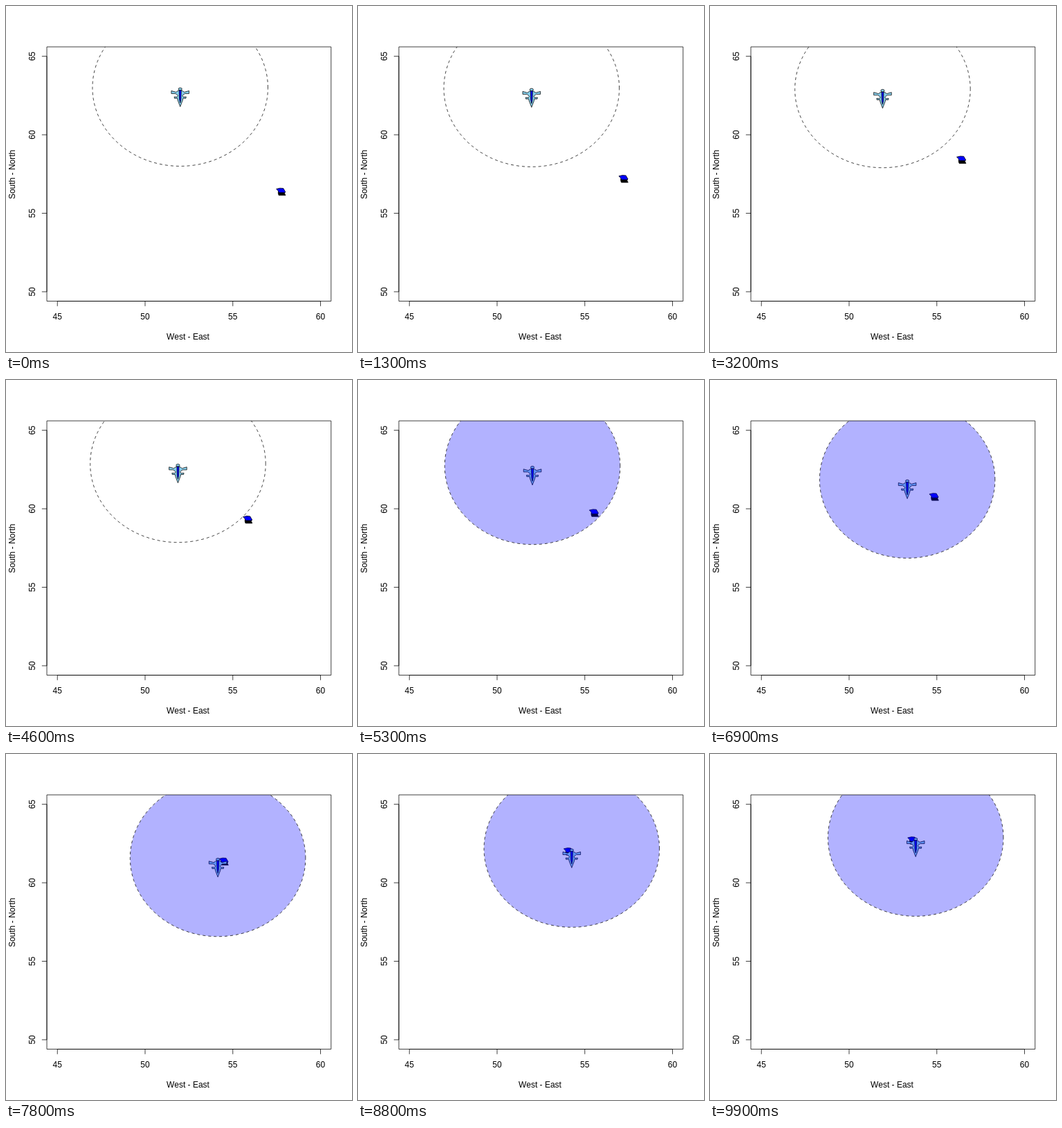
An HTML page for the animation above (10000 ms loop, 500 by 500 pixels).

```html
<!DOCTYPE html>
<html lang="en">
<head>
<meta charset="utf-8">
<title>Pursuit</title>
<style>
  html, body { margin: 0; width: 100%; height: 100%; overflow: hidden; background: #fff; }
  svg { display: block; width: 500px; height: 500px; }
  text { font: 12px "Liberation Sans", Arial, Helvetica, sans-serif; text-anchor: middle; }
  .axis { fill: none; stroke: #000; stroke-width: .75; }
  .bird { stroke: #000; stroke-width: .75; stroke-linejoin: round; }
</style>
</head>
<body>
<svg viewBox="0 0 500 500">
  <defs><clipPath id="plot"><rect x="59.04" y="59.04" width="410.72" height="367.52"/></clipPath></defs>
  <g clip-path="url(#plot)">
    <g id="prey" class="bird">
      <path fill="#000" d="M-4 0H6L5.2 2.6L6.6 5.2H-3.2L-4 2.8Z"/>
      <path fill="#00f" d="M-6.8 -4L-1.5 -5.2L3.4 -4.9L6.2 0L5.4 1.3H-3L-4.3 -1.6Z"/>
    </g>
    <g id="hunter" class="bird"></g>
    <path id="range" stroke="#000" stroke-width=".75" stroke-dasharray="4 4"/>
  </g>
  <g id="axes"></g>
</svg>
<script>
const STEP = 100, COUNT = 100, REACH = 5, SPEED = 0.098;
const UX = 25.353, UY = 22.686;           // pixels per unit
const LEFT = 59.04, TOP = 59.04, RIGHT = 469.76, BOTTOM = 426.56, TICK = 7.2;
const X = u => 74.25 + (u - 45) * UX;
const Y = u => 412.95 - (u - 50) * UY;
const $ = id => document.getElementById(id);

function add(parent, tag, attrs, text) {
  const el = document.createElementNS("http://www.w3.org/2000/svg", tag);
  for (const k in attrs) el.setAttribute(k, attrs[k]);
  if (text) el.textContent = text;
  parent.appendChild(el);
  return el;
}

function drawAxes() {
  const g = $("axes");
  const line = d => add(g, "path", { class: "axis", d });
  const label = (s, x, y, turn) =>
    add(g, "text", turn ? { transform: `translate(${x} ${y}) rotate(-90)` } : { x, y }, s);
  line(`M${LEFT} ${TOP}H${RIGHT}V${BOTTOM}H${LEFT}Z`);
  line(`M${X(45)} ${BOTTOM}H${X(60)}`);
  line(`M${LEFT} ${Y(50)}V${Y(65)}`);
  for (const u of [45, 50, 55, 60]) {
    line(`M${X(u)} ${BOTTOM}v${TICK}`);
    label(u, X(u), 453);
  }
  for (const u of [50, 55, 60, 65]) {
    line(`M${LEFT} ${Y(u)}h${-TICK}`);
    label(u, 42, Y(u), true);
  }
  label("West - East", 263, 482);
  label("South - North", 12.6, 243.4, true);
}

function drawHunter() {
  // right half, mirrored for the left
  const half = [[2.4, 4], [6, 6.4], [12.8, 4.5], [12.8, 8.6], [6.6, 8.6], [3.2, 11.4], [4.6, 13.6],
    [8.6, 13.2], [8.2, 15.4], [4.2, 15.2], [3.6, 18]];
  const mirror = half.map(([x, y]) => [-x, y]).reverse();
  const g = $("hunter");
  add(g, "polygon", { fill: "skyblue", points: [...half, [0, 27.5], ...mirror].join(" ") });
  add(g, "polygon", { fill: "#00f", points: "-1.5,3.6 1.5,3.6 1.1,17 0,22 -1.1,17" });
  add(g, "ellipse", { fill: "skyblue", cx: 0, cy: 2, rx: 2.6, ry: 1.8 });
}

// step, x, y of the prey's middle
const path = [[0, 397.4, 268.4], [13, 383.7, 249.8], [32, 363.3, 222.2], [46, 349.3, 201.8],
  [60, 332.8, 182.4], [78, 314.7, 155.4], [99, 292.5, 125]];

function preyAt(n) {
  let i = 1;
  while (path[i][0] < n) i++;
  const [a, ax, ay] = path[i - 1], [b, bx, by] = path[i];
  const k = (n - a) / (b - a);
  return [ax + (bx - ax) * k, ay + (by - ay) * k];
}

// drift, then pure pursuit once the prey is in reach
function simulate() {
  const states = [];
  let x = X(52), y = Y(63), chase = false, caught = false;
  for (let n = 0; n < COUNT; n++) {
    const prey = preyAt(n);
    const tx = prey[0] + 4.7, ty = prey[1] - 4;
    const dist = () => Math.hypot((tx - x) / UX, (ty - y) / UY);
    if (chase) {
      const d = dist();
      if (caught || d <= SPEED) {
        caught = true;
        x = tx; y = ty;
      } else {
        x += (tx - x) * SPEED / d;
        y += (ty - y) * SPEED / d;
      }
    } else {
      if (n) { x -= 0.071; y += 0.07; }
      chase = dist() < REACH;
    }
    states.push({ prey, x, y, chase });
  }
  return states;
}

drawAxes();
drawHunter();
const rx = REACH * UX, ry = REACH * UY;
$("range").setAttribute("d",
  `M${rx} 0A${rx} ${ry} 0 0 0 ${-rx} 0A${rx} ${ry} 0 0 0 ${rx} 0Z`);
const states = simulate();

function render() {
  const s = states[Math.floor(performance.now() / STEP) % COUNT];
  const at = `translate(${s.x} ${s.y})`;
  $("prey").setAttribute("transform", `translate(${s.prey})`);
  $("hunter").setAttribute("transform", at);
  $("range").setAttribute("transform", at);
  $("range").setAttribute("fill", s.chase ? "rgba(0,0,255,.3)" : "none");
  requestAnimationFrame(render);
}
render();
</script>
</body>
</html>
```
